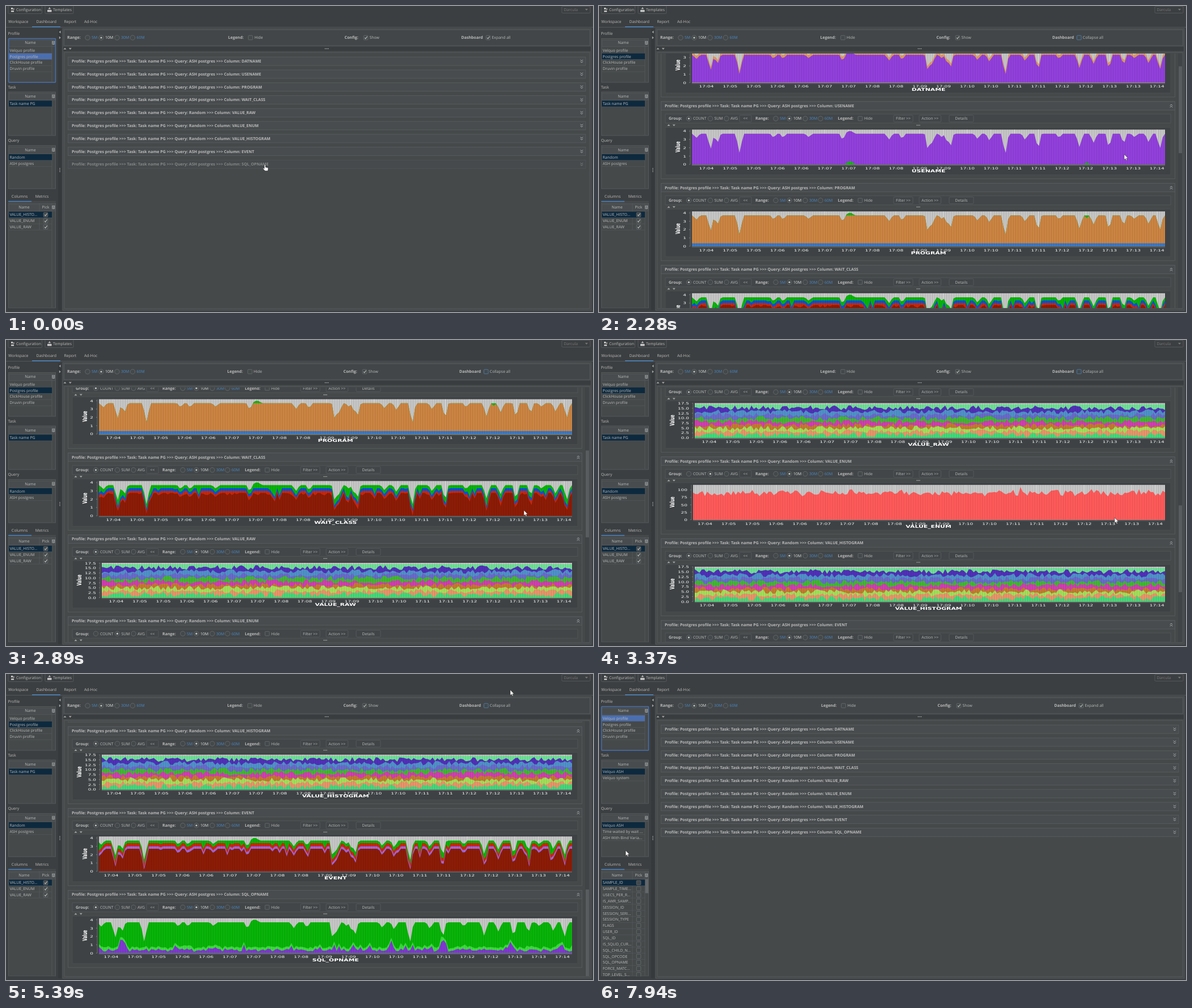
An HTML page for the animation above (8 s loop, 1036 by 541 pixels).

```html
<!DOCTYPE html>
<html lang="en">
<head>
<meta charset="utf-8">
<title>Dashboard</title>
<style>
html, body { margin: 0; width: 100%; height: 100%; overflow: hidden; background: #3c3f41; }
svg { display: block; width: 100vw; height: 100vh; }
text { font: 6.9px "Open Sans", "Noto Sans", sans-serif; fill: #bbb; white-space: pre; text-rendering: geometricPrecision; }
.b { font-weight: 700; font-size: 7.05px; }
.tick { font: 5.8px "DejaVu Sans", sans-serif; fill: #f2f2f2; }
.title { font: 700 7px "DejaVu Sans", sans-serif; fill: #fff; }
</style>
</head>
<body>
<svg id="stage" viewBox="0 0 1036 541" xmlns="http://www.w3.org/2000/svg"></svg>
<script>
const LOOP = 8000, LINE = '#5b5e60', FIELD = '#45494a', CHROME = '#3c3f41';
const BLUE = '#4a88c7', SELECT = '#4b6eaf', IDLE = '#0d293e';
const TOP = 97.7, PITCH = 144.65, ROW = 22.77, MAX_SCROLL = 865;
const EXPAND_AT = 1399, COLLAPSE_AT = 5930, PICK_AT = 7470;

const text = (x, y, s, o = '') =>
  `<text x="${x}" y="${y + 2.45}" ${o}>${s.replace(/</g, '&lt;').replace(/>/g, '&gt;')}</text>`;
const bold = (x, y, s) => text(x, y, s, 'class="b"');
const mid = (x, y, s, o = '') => text(x, y, s, 'text-anchor="middle" ' + o);
const rect = (x, y, w, h, fill = 'none', stroke = 'none', o = '') =>
  `<rect x="${x}" y="${y}" width="${w}" height="${h}" fill="${fill}" stroke="${stroke}" stroke-width=".8" ${o}/>`;
const path = (d, fill = 'none', stroke = 'none', w = 1) =>
  `<path d="${d}" fill="${fill}" stroke="${stroke}" stroke-width="${w}"/>`;
const button = (x, y, w, s) =>
  rect(x, y - 6, w, 12, '#414547', LINE, 'rx="1.5"') + mid(x + w / 2, y, s);
const dots = (x, y, dx, dy) => [-1, 0, 1].map(k =>
  `<circle cx="${x + k * dx}" cy="${y + k * dy}" r=".8" fill="#bbb"/>`).join('');
const arrows = (x, y) =>
  path(`M${x - 2.5} ${y + 1.3}h5l-2.5 -3ZM${x + 6.8} ${y - 1.3}h5l-2.5 3Z`, '#a2a4a5');
const radio = (x, y, on) =>
  `<circle cx="${x}" cy="${y}" r="4.2" fill="#43494a" stroke="#6b6e70" stroke-width=".8"/>` +
  (on ? `<circle cx="${x}" cy="${y}" r="1.6" fill="#c4c4c4"/>` : '');
const check = (x, y, on, focus) =>
  rect(x - 3.8, y - 3.8, 7.6, 7.6, '#43494a', focus ? '#4f83bd' : '#6b6e70', 'rx="1"') +
  (on ? path(`M${x - 2} ${y}l1.6 1.9 3 -4.2`, 'none', '#c0c0c0', 1.1) : '');
const ranges = (xs, y) => xs.map((x, k) => radio(x, y, k === 1) +
  text(x + 7, y, ['5M', '10M', '30M', '60M'][k], `style="fill:${k === 1 ? '#e4e4e4' : BLUE}"`)).join('');
const chevron = (x, y, up) => {
  const d = up ? -2 : 2;
  return path(`M${x - 2.3} ${y - d * 1.3}l2.3 ${d}l2.3 ${-d}m-4.6 ${d * 1.5}l2.3 ${d}l2.3 ${-d}`, 'none', '#b4b6b7', .9);
};

function random(seed) {
  return () => (seed = (seed * 16807) % 2147483647) / 2147483647;
}

// Session activity: a flat load with short drops, as [x, value] pairs.
const drops = [[172, 3.2], [197, 1.9], [209, 2.7], [248, 1.4], [308, 3.3], [325, 3.3], [370, 3.3],
  [430, 3.1], [512, 3], [535, 3.2], [581, 1.95], [588, 2.6], [605, 3.3], [614, 2.9], [620, 2.3],
  [668, 3.1], [689, 2.9], [717, 1.4], [752, 3], [775, 2.2], [812, 3.3], [848, 2.1], [873, 2.6],
  [900, 2.3], [926, 2.7], [945, 3.3], [970, 2.7], [990, 2]];
const peak = (x, at, w) => Math.min(1, Math.max(0, 1.35 * (1 - Math.abs(x - at) / w)));
const bump = x => .3 * peak(x, 443, 9);
const load = x => drops.reduce((v, [at, low]) => Math.min(v, 3.7 - (3.7 - low) * peak(x, at, 6)), 3.7) + bump(x);
const spike = (r, p, size) => r() < p ? r() * size : 0;

// Each f returns running totals from the bottom layer upwards.
const waits = (x, r) => {
  const v = load(x);
  const red = Math.max(.5, 3 - 1.2 * Math.max(0, 3.7 - v) - spike(r, .12, 1.1));
  return [red, v];
};
const levels = [1.6, 3.3, 5, 6.3, 8.2, 9.9, 11.6, 13.3, 15.2];
const mixed = (x, r) => {
  let last = 0;
  return [...levels.map(v => last = Math.max(last + .1, v + (r() - .5) * 2.4)), 17];
};
const mixedColors = ['#3fdb7a', '#e8946a', '#a2e05a', '#c47a30', '#d03fb0', '#42b832', '#6a6acb', '#4f92c8', '#5130b8', '#6fe096'];
const four = [0, 1, 2, 3, 4], wide = [0, 2.5, 5, 7.5, 10, 12.5, 15, 17.5];
const ash = 'ASH postgres';
const charts = [
  { name: 'DATNAME', query: ash, colors: ['#9240dc', '#dc9a62'], f: x => [load(x) - .35, load(x)] },
  { name: 'USENAME', query: ash, colors: ['#18b418', '#9240dc'],
    f: x => [Math.max(bump(x) * 1.2, .25 * peak(x, 861, 5)), load(x)] },
  { name: 'PROGRAM', query: ash, colors: ['#3a78c8', '#cc8442', '#18b418'],
    f: x => [.35, load(x) - bump(x) - .3 * peak(x, 861, 5), load(x)] },
  { name: 'WAIT_CLASS', query: ash, colors: ['#8c1c06', '#c6280e', '#0a50e0', '#08b408'],
    f: (x, r) => { const [a, v] = waits(x, r); return [a - .25 - spike(r, .3, .3), a, Math.min(v, a + .32), v]; } },
  { name: 'VALUE_RAW', query: 'Random', left: 169, first: 194.5, unit: 3.49, ticks: wide, colors: mixedColors, f: mixed },
  { name: 'VALUE_ENUM', query: 'Random', left: 166, first: 187, unit: .525, ticks: [0, 25, 50, 75, 100], colors: ['#ff5a5a'],
    f: (x, r) => [90 + (r() + r() - 1) * 13 + spike(r, .05, 12)] },
  { name: 'VALUE_HISTOGRAM', query: 'Random', left: 169, first: 190.5, unit: 3.49, ticks: wide, colors: mixedColors, f: mixed },
  { name: 'EVENT', query: ash, first: 185.5, colors: ['#8c1c06', '#a066dc', '#cc260c', '#08b408'],
    f: (x, r) => { const [a, v] = waits(x + 4, r); return [a - .3, a, Math.min(v, a + .38), v]; } },
  { name: 'SQL_OPNAME', query: ash, first: 185.5, colors: ['#8038d0', '#3cdc3c', '#08b408'],
    f: (x, r) => {
      const v = load(x + 4);
      const burst = Math.max(...[205, 680, 773, 890].map(p => peak(x, p, 6)));
      const low = .15 + r() * .4 + spike(r, .15, .8) + 1.1 * burst;
      return [low, low + .32 + spike(r, .1, .4), v].map(n => Math.min(n, v));
    } }
];

const headline = c =>
  `Profile: Postgres profile >>> Task: Task name PG >>> Query: ${c.query} >>> Column: ${c.name}`;

function plot(c, y, seed) {
  const { left = 164, first = 189.5, unit = 14.7, ticks = four, colors, f } = c;
  const right = 999, zero = y + 103.5, n = 200, r = random(seed);
  const xs = Array.from({ length: n }, (_, k) => left + (right - left) * k / (n - 1));
  const data = xs.map(x => f(x, r));
  const stretch = (x, dy, s, cls, anchor) =>
    `<text class="${cls}" text-anchor="${anchor}" transform="translate(${x} ${dy + 2.2}) scale(1.55 1)">${s}</text>`;
  let out = rect(117, y + 38, 892, 84, '#3e4244', '#4d5052') + rect(left, y + 42, right - left, 61.8, '#c6c6c6');
  for (let k = 0; k < 20; k++) {
    const x = first + (984.8 - first - (first < 189 ? 2.8 : 0)) * k / 19;
    const minute = String(4 + Math.ceil(k / 2)).padStart(2, '0');
    out += path(`M${x} ${y + 42}v61.5`, 'none', '#e6e6e6', .6) + stretch(x, y + 110.2, '17:' + minute, 'tick', 'middle');
  }
  for (let k = colors.length - 1; k >= 0; k--) {
    const line = xs.map((x, j) => `${x.toFixed(1)} ${(zero - Math.max(0, data[j][k]) * unit).toFixed(1)}`);
    out += path(`M${left} ${zero}L${line.join('L')}L${right} ${zero}Z`, colors[k]);
  }
  out += rect(left, y + 42, right - left, 61.5, 'url(#stripes)');
  for (const v of ticks) {
    const ty = zero - v * unit;
    out += stretch(left - 10, ty, ticks === wide ? v.toFixed(1) : v, 'tick', 'end') +
      path(`M${left - 5} ${ty}h2`, 'none', '#999', .6);
  }
  out += path(`M${left - 3} ${y + 42}V${zero}M${left} ${y + 105}H${right}`, 'none', '#8a8c8d', .6);
  // Wider tick labels push the axis name further out.
  const nameX = ticks === four ? 142.5 : 132.5;
  out += `<text class="title" style="font-size:6.2px" text-anchor="middle" transform="translate(${nameX} ${y + 72.5}) rotate(-90) scale(1 1.8)">Value</text>`;
  return out + stretch(581.5, y + 115.5, c.name, 'title', 'middle');
}

function panel(c, k) {
  const y = TOP + k * PITCH, g = y + 22.5, sum = c.name === 'VALUE_ENUM';
  return rect(109.5, y - 7.5, 907, 136.5, FIELD, LINE) +
    `<g class="open">${rect(109.5, y - 7.5, 907, 15, '#484c4e', LINE)}${bold(116, y, headline(c))}${chevron(1010, y, true)}</g>` +
    rect(117, y + 14.5, 892, 16, '#424648', '#55585a') + bold(123, g, 'Group:') +
    radio(158.5, g, !sum) + text(166, g, 'COUNT') + radio(196.5, g, sum) + text(203.5, g, 'SUM') +
    radio(225, g) + text(232, g, 'AVG') + button(248, g, 21, '<<') +
    bold(276, g, 'Range:') + ranges([312, 336, 364, 391], g) + bold(421.5, g, 'Legend:') +
    check(461, g) + text(468, g, 'Hide') + button(520, g, 34, 'Filter >>') +
    button(565, g, 38.5, 'Action >>') + button(618, g, 43, 'Details') +
    arrows(123, y + 34.2) + dots(563.5, y + 34.2, 2.4, 0) + plot(c, y, 4219 + k * 977);
}

function closedRow(c, k) {
  const y = TOP + k * ROW;
  return `<g class="shut">${rect(109.5, y - 7.5, 913.5, 15, '#484c4e', LINE)}${bold(116, y, headline(c))}${chevron(1016, y)}</g>`;
}

function table(y, h, rows, selected, focus, pick) {
  const head = y + 8, first = y + 20.8, nameEnd = pick ? 59 : 81;
  let out = rect(4.5, y, 83, h, FIELD, LINE) + rect(5, head - 5.5, 82, 11.5, '#484c4e', '#55585a') +
    mid((5 + nameEnd) / 2, head - .5, 'Name') + path(`M81 ${y + 1}v${h - 2}`, 'none', LINE, .7) +
    rect(81.8, head - 3, 4, 5, 'none', '#b0b2b3') + path(`M81.8 ${head - 1}h4m-2 0v4`, 'none', '#b0b2b3', .7);
  if (pick) out += mid(70, head - .5, 'Pick') + path(`M59 ${y + 1}v${Math.min(h - 2, 14 + rows.length * 10.84)}`, 'none', LINE, .7);
  rows.forEach((s, k) => {
    const ry = first + k * 10.84;
    if (k === selected) out += rect(5, ry - 5.4, 76, 10.8, focus ? SELECT : IDLE);
    out += path(`M5 ${ry + 5.4}H81`, 'none', '#595c5e', .6) + text(6.5, ry, s);
    if (pick) out += check(70, ry, pick === 'on');
  });
  if (focus) out += `<rect x="4.5" y="${y}" width="83" height="${h}" rx="1" fill="none" stroke="#466fb0" stroke-width="1.5"/>`;
  return out;
}

const hostColumns = ('SAMPLE_ID SAMPLE_TIME... USECS_PER_R... IS_AWR_SAMP... SESSION_ID SESSION_SERI... SESSION_TYPE ' +
  'FLAGS USER_ID SQL_ID IS_SQLID_CUR... SQL_CHILD_N... SQL_OPCODE SQL_OPNAME FORCE_MATC... TOP_LEVEL_S...').split(' ');

function sidebar(second, focus) {
  const profiles = ['Velquo profile', 'Postgres profile', 'ClickHouse profile', 'Druvin profile'];
  return text(3.5, 49, 'Profile') + table(57.5, 77.5, profiles, second ? 0 : 1, focus) +
    text(3.5, 143.5, 'Task') + table(152, 77, second ? ['Velquo ASH', 'Velquo system'] : ['Task name PG'], 0) +
    text(3.5, 238, 'Query') +
    table(246.7, 76.3, second ? ['Velquo ASH', 'Time waited by wait ...', 'ASH With Bind Varia...'] : ['Random', ash], 0) +
    mid(24, 336.5, 'Columns') + mid(63.5, 336.5, 'Metrics') + path('M4 345.7H88', 'none', LINE, .7) +
    path('M4 345.5H45', 'none', BLUE, 1.4) +
    '<g clip-path="url(#side)">' +
    table(348.2, 185.8, second ? hostColumns : ['VALUE_HISTO...', 'VALUE_ENUM', 'VALUE_RAW'], 0, false, second ? 'off' : 'on') +
    (second ? rect(81.5, 362.5, 5.5, 25, '#63676a') : '') + '</g>';
}

function configBar(open, focus) {
  const d = open ? 1 : 0, y = 56;
  return bold(108, y, 'Range:') + ranges([144, 168, 196, 223.5], y) +
    bold(392 - 1.5 * d, y, 'Legend:') + check(431.5 - d, y) + text(438.5 - 1.5 * d, y, 'Hide') +
    bold(597.5 - 2 * d, y, 'Config:') + check(635 - 2 * d, y, true) + text(641.5 - 2 * d, y, 'Show') +
    bold(803.5 - 3.5 * d, y, 'Dashboard') + check(851 - 3.7 * d, y, !open, focus) +
    text(857.5 - 3.7 * d, y, open ? 'Collapse all' : 'Expand all');
}

function chrome() {
  return rect(0, 0, 1036, 541, CHROME) +
    rect(4, -1, 59.5, 14.5, CHROME, LINE, 'rx="1.5"') + text(18, 6.5, 'Configuration') +
    path('M9 3h3v3h-3ZM9 8h5v2.5h-5ZM12.5 4.5h2v2h-2Z', '#c8c8c8') +
    rect(69, -1, 50, 14.5, CHROME, LINE, 'rx="1.5"') + text(83, 6.5, 'Templates') +
    path('M73 7h7.5v3.5h-7.5ZM74.5 5.5h4.5v-1h-1.5v-2h-1.5v2h-1.5Z', '#c8c8c8') +
    rect(981, .5, 50, 12, CHROME, LINE, 'rx="1.5"') + text(984.5, 6.5, 'Darcula', 'style="fill:#777"') +
    path('M1022 5h5l-2.5 3Z', '#777') +
    text(4, 27.5, 'Workspace') + text(53.5, 27.5, 'Dashboard') + text(102.5, 27.5, 'Report') + text(138, 27.5, 'Ad-Hoc') +
    path('M0 37.5H1036', 'none', LINE, .8) + path('M46 36.8H96', 'none', BLUE, 1.6) +
    rect(92, 41, 6, 497, '#36393b') + path('M96.5 43.5v5l-3 -2.5ZM93.8 53.5v5l3 -2.5Z', '#a2a4a5') + dots(95, 290, 0, 2.8) +
    rect(100, 40, 933, 498, FIELD, LINE) + rect(102.5, 42, 928, 28, '#424648', LINE) +
    rect(101, 72, 931, 7.5, '#3a3d3f') + arrows(104, 75.5) + dots(566, 75.5, 2.6, 0) +
    rect(103, 82, 927, 453, FIELD, LINE);
}

const arrow = path('M0 0V9.6L2.2 7.6 3.7 11 5.2 10.3 3.8 7.1H6.7Z', '#fff', '#222', .5);
const hand = path('M0 .5Q1 -.5 2 .5V4.5L5.5 5.2Q7 5.6 6.8 7.5L6 11H1.2L-2.3 7.2Q-2.3 5.6 -1 6.2L0 7Z', '#fff', '#222', .5);

document.getElementById('stage').innerHTML = `<defs>
  <pattern id="stripes" width="4.2" height="8" patternUnits="userSpaceOnUse"><path d="M.5 0V8" stroke="#000" stroke-opacity=".14" stroke-width=".8"/></pattern>
  <clipPath id="view"><rect x="103.5" y="84" width="926" height="450"/></clipPath>
  <clipPath id="side"><rect x="3" y="346" width="86" height="188.4"/></clipPath></defs>
  ${chrome()}<g id="side-lists"></g><g id="config"></g>
  <g id="closed">${charts.map(closedRow).join('')}</g>
  <g id="opened" clip-path="url(#view)"><g id="content">${charts.map(panel).join('')}</g>
  ${rect(1022, 84, 8, 450, '#404446')}<rect id="thumb" x="1023" width="6" height="153.5" fill="#585c5e"/></g>
  <g id="pointer"><g id="arrow">${arrow}</g><g id="hand">${hand}</g></g>`;

const show = (el, on) => el.setAttribute('display', on ? 'inline' : 'none');
const ui = Object.fromEntries(['side-lists', 'config', 'closed', 'opened', 'content', 'thumb', 'pointer', 'arrow', 'hand']
  .map(id => [id, document.getElementById(id)]));
const openHeads = [...document.querySelectorAll('.open')], shutHeads = [...document.querySelectorAll('.shut')];

const pointerKeys = [[0, 456, 280.5], [850, 912, 61], [900, 911, 60], [1130, 851, 56], [1630, 851, 57],
  [2140, 925, 254], [2276, 927, 262], [2888, 914, 301], [3240, 911, 312], [3362, 910, 314], [4300, 910, 314],
  [4310, 910.5, 313.5], [4800, 910.5, 313.5], [5387, 890, 28], [5600, 884, 40], [5800, 850, 56],
  [6080, 850, 56], [6430, 640, 255], [7250, 16, 77], [7480, 24, 79], [7880, 47, 312]];
const scrollKeys = [[2170, 0], [2276, 65], [2420, 125], [2888, 325], [3240, 545], [3360, 607],
  [3440, 645], [3690, 645], [3840, 813], [4800, 813], [5050, MAX_SCROLL]];

function at(keys, t) {
  const k = keys.findIndex(key => key[0] > t);
  if (k === 0) return keys[0].slice(1);
  if (k < 0) return keys[keys.length - 1].slice(1);
  const a = keys[k - 1], b = keys[k], p = (t - a[0]) / (b[0] - a[0]);
  return a.slice(1).map((v, j) => v + (b[j + 1] - v) * p);
}

let lastState = '';
function draw(time) {
  const t = Math.max(0, 2278 + Math.floor((time - 2278) / 67.6) * 67.6);
  const open = t >= EXPAND_AT && t < COLLAPSE_AT;
  const second = t >= PICK_AT, listFocus = second || t < EXPAND_AT;
  const [x, y] = at(pointerKeys, t), [scroll] = at(scrollKeys, t);
  const state = [open, second, listFocus].join();
  if (state !== lastState) {
    lastState = state;
    ui['side-lists'].innerHTML = sidebar(second, listFocus);
    ui.config.innerHTML = configBar(open, !listFocus);
    show(ui.opened, open);
    show(ui.closed, !open);
  }
  ui.content.setAttribute('transform', `translate(0 ${-scroll})`);
  ui.thumb.setAttribute('y', 84 + scroll * 297 / MAX_SCROLL);

  let over = false;
  (open ? openHeads : shutHeads).forEach((el, k) => {
    const row = open ? TOP + k * PITCH - scroll : TOP + k * ROW;
    const hit = x > 109 && x < (open ? 1016 : 1023) && y > 84 && Math.abs(y - row) < 7.5;
    el.setAttribute('opacity', hit ? .55 : 1);
    over = over || hit;
  });
  show(ui.hand, over);
  show(ui.arrow, !over);
  ui.pointer.setAttribute('transform', `translate(${x} ${y})`);
}

const start = performance.now();
function tick() {
  draw((performance.now() - start) % LOOP);
  requestAnimationFrame(tick);
}
tick();
</script>
</body>
</html>
```
